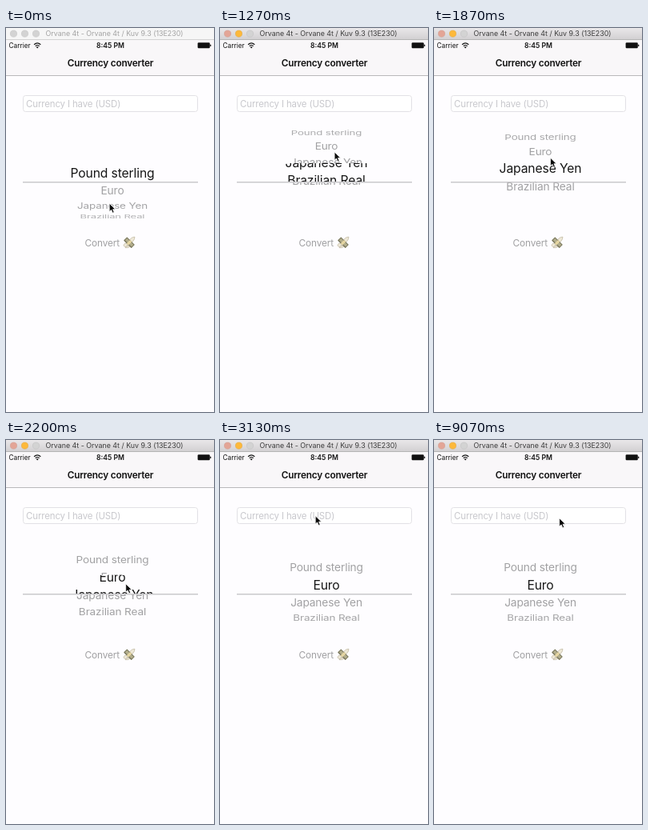
An HTML page for the animation above (9990 ms loop, 260 px wide and 480 px high).

```html
<!DOCTYPE html>
<html lang="en">
<head>
<meta charset="utf-8">
<title>Currency converter</title>
<style>
  html, body { margin: 0; width: 100%; height: 100%; overflow: hidden; background: #fefdff; }
  svg { display: block; width: 260px; height: 480px; font-family: Inter, Roboto, sans-serif; }
  .mid { text-anchor: middle; }
  #bar { fill: #f6f6f6; }
  #bar circle { fill: #d3d3d3; stroke: #bdbdbd; stroke-width: .5; }
  #bar text { font-size: 8.9px; fill: #a3a3a3; }
  #bar line { stroke: #d2d2d2; }
  #bar.active { fill: url(#metal); }
  #bar.active text { fill: #3c3c3c; }
  #bar.active line { stroke: #b5b5b5; }
  #bar.active .close { fill: #e3a596; stroke: #cf9488; }
  #bar.active .shrink { fill: #fdb93b; stroke: #dfa032; }
  #grey text { font-size: 13.8px; letter-spacing: -.12px; fill: #a0a0a2; }
  #black text { font-size: 15.7px; letter-spacing: -.13px; fill: #161616; }
</style>
</head>
<body>
<svg viewBox="0 0 260 480">
  <defs>
    <linearGradient id="metal" x2="0" y2="1">
      <stop stop-color="#e9e7e9"/><stop offset="1" stop-color="#d1cfd1"/>
    </linearGradient>
    <clipPath id="band"><path d="M0 169H260V193H0z"/></clipPath>
  </defs>

  <path d="M0 15H260V59H0z" fill="#f9f7f9"/>
  <path d="M0 59.5H260" stroke="#b9b8ba"/>

  <g id="bar">
    <rect width="260" height="15"/>
    <line y1="14.5" x2="260" y2="14.5"/>
    <circle class="close" cx="9.5" cy="7.1" r="4.1"/>
    <circle class="shrink" cx="23.5" cy="7.1" r="4.1"/>
    <circle cx="37.5" cy="7.1" r="4.1"/>
    <text class="mid" x="135.5" y="10.4">Orvane 4t - Orvane 4t / Kuv 9.3 (13E230)</text>
  </g>

  <g fill="#111">
    <text x="3.5" y="25" font-size="8.3">Carrier</text>
    <text class="mid" x="130.5" y="25" font-size="8.6" font-weight="600">8:45 PM</text>
    <text class="mid" x="130.5" y="48.4" font-size="11.8" font-weight="600" letter-spacing="-.2">Currency converter</text>
    <path d="M35.1 20.7Q39.2 16.9 43.3 20.7M36.7 22.6Q39.2 20.4 41.7 22.6" fill="none" stroke="#111" stroke-width="1.2"/>
    <path d="M37.6 23.7Q39.2 22.6 40.8 23.7L39.2 25.5z"/>
    <rect x="239.6" y="18.2" width="15.2" height="7.1" rx="1.2"/>
    <rect x="255.1" y="20.5" width="1.2" height="2.5" rx=".5"/>
  </g>

  <rect x="21.5" y="84.5" width="218" height="20" rx="3" fill="#fff" stroke="#e2e1e5"/>
  <text x="25" y="98.8" font-size="11.5" letter-spacing="-.16" fill="#c8c8cd">Currency I have (USD)</text>

  <g id="grey" class="mid"></g>
  <path d="M15 169H245V193H15z" fill="#fefdff"/>
  <g clip-path="url(#band)"><g id="black" class="mid"></g></g>
  <path d="M21 192.7H240" stroke="#cac9cc" stroke-width="1.6"/>

  <text x="98.5" y="272.7" font-size="11.8" letter-spacing="-.1" fill="#a0a0a2">Convert</text>
  <g transform="translate(154 268.2)" stroke-width=".5">
    <path d="M0-2Q2-7 7-7Q7-3 3 0zM-2 1Q-6 0-7 3Q-7 6-2 5z" fill="#efe9d8" stroke="#a69d80"/>
    <g transform="rotate(45)">
      <rect x="-6.8" y="-3" width="13.6" height="6" rx=".6" fill="#77755a"/>
      <rect x="-5.8" y="-2" width="11.6" height="3.6" fill="#b3ae8c"/>
      <rect x="-1.6" y="-3" width="3.2" height="6" fill="#e6d6a2"/>
    </g>
    <path d="M-1 4Q-4 4-5 6.5Q-1 7 1 5z" fill="#efe9d8" stroke="#a69d80"/>
  </g>

  <path id="cursor" d="M.2 .7V11.1L2.6 8.9L4.3 12.7L6.2 11.9L4.6 8.2H7.8z" fill="#0a0a0a" stroke="#fff" stroke-width=".8"/>
</svg>

<script>
const LOOP = 9990, STEP = 66;
const CENTER = 181.2, RADIUS = 61, ROW_ANGLE = .37;
const NAMES = ['Pound sterling', 'Euro', 'Japanese Yen', 'Brazilian Real'];

// Spans in which the picture moves; it holds still after each one.
const SPANS = [[0, 0], [70, 130], [1130, 1600], [1800, 2200], [2330, 2330], [2470, 3130], [8930, 9070]];

// time, pointer x, pointer y, wheel position in rows
const KEYS = [
  [0, 129, 218.5, 0], [130, 129.5, 219, 0],
  [1130, 142.5, 154, 2.58], [1470, 143.5, 154.5, 2.56], [1600, 144, 156, 2.5],
  [1800, 144.5, 158, 2.4], [2196, 149.5, 179, 1.44], [2330, 150, 183, 1.27],
  [2470, 150, 183, 1.21], [2740, 146, 163, 1], [3130, 119, 94, 1],
  [8930, 124, 94, 1], [9062, 156.5, 97, 1]
];

const $ = id => document.getElementById(id);

function addRows(parent) {
  return NAMES.map(name => {
    const row = document.createElementNS('http://www.w3.org/2000/svg', 'text');
    row.textContent = name;
    return parent.appendChild(row);
  });
}
const greyRows = addRows($('grey')), blackRows = addRows($('black'));

function snap(t) {
  const [start, end] = SPANS.findLast(span => span[0] <= t);
  return Math.min(end, start + Math.floor((t - start + 8) / STEP) * STEP);
}

function pose(t) {
  const i = KEYS.findLastIndex(key => key[0] <= t);
  const a = KEYS[i], b = KEYS[i + 1] || a;
  const u = a === b ? 0 : (t - a[0]) / (b[0] - a[0]);
  return a.map((v, k) => v + (b[k] - v) * u).slice(1);
}

function draw(t) {
  const [x, y, wheel] = pose(snap(t));
  $('bar').classList.toggle('active', t >= 70);
  $('cursor').setAttribute('transform', `translate(${x} ${y})`);
  NAMES.forEach((_, i) => {
    const angle = (i - wheel) * ROW_ANGLE, depth = Math.cos(angle);
    const place = `translate(133 ${CENTER + RADIUS * Math.sin(angle)})`;
    greyRows[i].setAttribute('transform', `${place} scale(${.9 + .1 * depth} ${depth}) translate(0 4.9)`);
    greyRows[i].setAttribute('opacity', Math.min(1, .6 + .5 * depth));
    blackRows[i].setAttribute('transform', `${place} translate(0 5.5)`);
  });
}

const begin = performance.now();
function tick() {
  draw((performance.now() - begin) % LOOP);
  requestAnimationFrame(tick);
}
tick();
</script>
</body>
</html>
```
